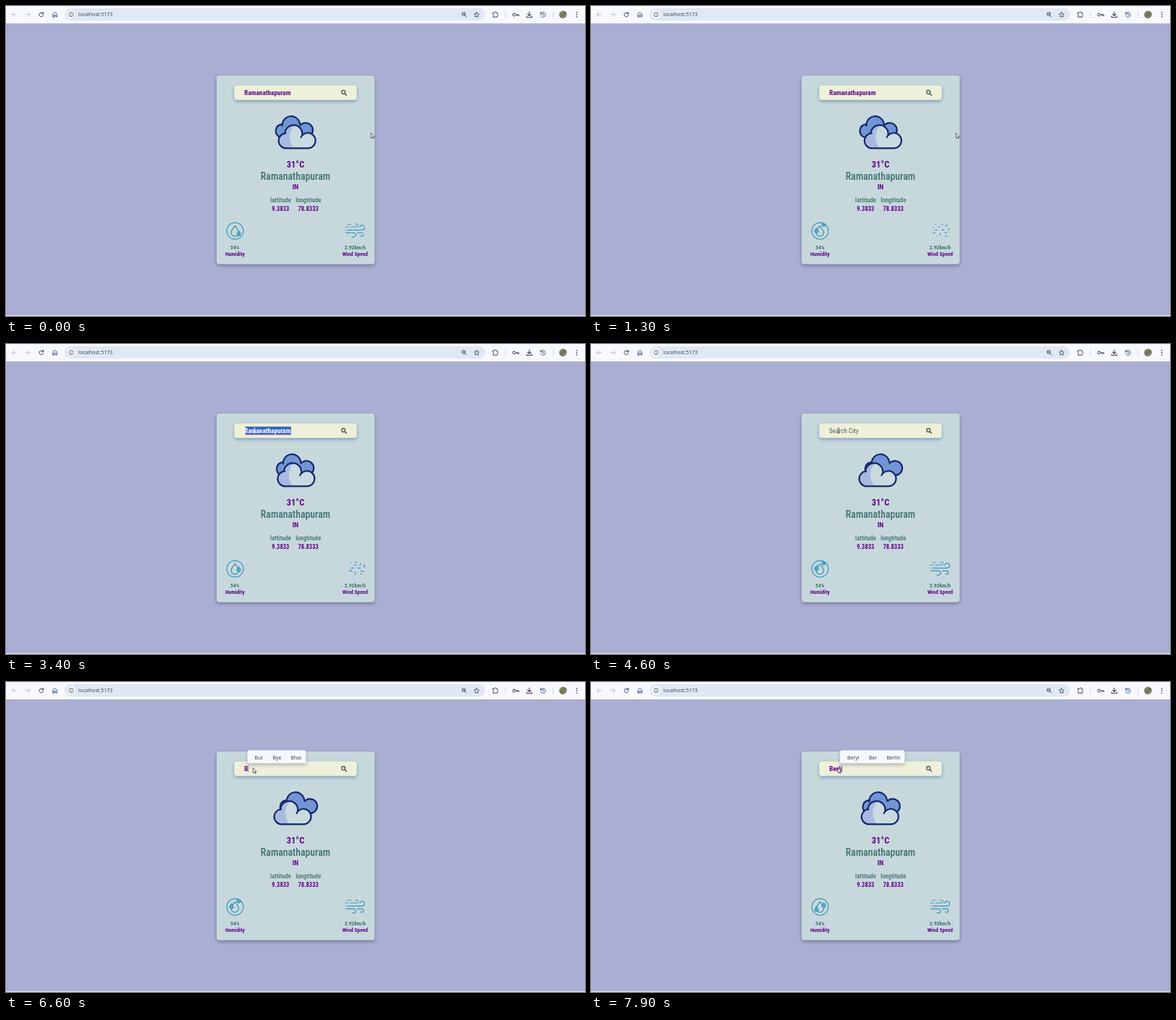
An HTML page with a canvas that plays this animation: 800x428 px, repeating every 8000 ms.

```html
<!DOCTYPE html>
<html lang="en">
<head>
<meta charset="utf-8">
<title>Weather card</title>
<style>
html, body { margin: 0; width: 100%; height: 100%; overflow: hidden; background: #abaed3; }
canvas { display: block; width: 800px; height: 428px; }
</style>
</head>
<body>
<canvas id="stage"></canvas>
<script>
const canvas = document.getElementById('stage');
const ctx = canvas.getContext('2d');
const ratio = window.devicePixelRatio || 1;
canvas.width = 800 * ratio;
canvas.height = 428 * ratio;

const LOOP = 8000, STEP = 100, TAU = Math.PI * 2;
const PURPLE = '#63058a', TEAL = '#41716f', CARD = '#c7d8dd', NAVY = '#14276a', AQUA = '#3795b5', INK = '#3c4250';
const CITY = 'Ramanathapuram';
const NARROW = '"Roboto Condensed", Roboto, sans-serif';
const UI = '"Open Sans", "Noto Sans", sans-serif';

// Tighten the tracking when only the normal width is installed.
ctx.fontStretch = 'condensed';
ctx.font = '500 100px ' + NARROW;
const tracking = ctx.measureText(CITY).width > 760 ? -0.065 : 0;
ctx.fontStretch = 'normal';

function setNarrow(size, weight) {
  ctx.fontStretch = 'condensed';
  ctx.font = `${weight} ${size}px ${NARROW}`;
  ctx.letterSpacing = tracking * size + 'px';
}

function label(str, x, y, size, weight, color, align = 'center') {
  setNarrow(size, weight);
  ctx.textAlign = align;
  ctx.fillStyle = color;
  ctx.fillText(str, x, y);
}

function uiText(str, x, y, color) {
  ctx.fontStretch = 'normal';
  ctx.letterSpacing = '0px';
  ctx.font = '7px ' + UI;
  ctx.textAlign = 'left';
  ctx.fillStyle = color;
  ctx.fillText(str, x, y);
}

function box(x, y, w, h, r, fill, shadow) {
  ctx.save();
  if (shadow) {
    ctx.shadowColor = shadow;
    ctx.shadowBlur = 5 * ratio;
    ctx.shadowOffsetY = 2 * ratio;
  }
  ctx.fillStyle = fill;
  ctx.beginPath();
  ctx.roundRect(x, y, w, h, r);
  ctx.fill();
  ctx.restore();
}

function line(d, color, width = 1, dx = 0, dy = 0) {
  ctx.save();
  ctx.translate(dx, dy);
  ctx.strokeStyle = color;
  ctx.lineWidth = width;
  ctx.lineCap = ctx.lineJoin = 'round';
  ctx.stroke(new Path2D(d));
  ctx.restore();
}

function disc(x, y, r, color) {
  ctx.fillStyle = color;
  ctx.beginPath();
  ctx.arc(x, y, r, 0, TAU);
  ctx.fill();
}

function ring(x, y, r, color, width = 1) {
  ctx.strokeStyle = color;
  ctx.lineWidth = width;
  ctx.beginPath();
  ctx.arc(x, y, r, 0, TAU);
  ctx.stroke();
}

// Linear interpolation through [position, value] pairs.
function along(keys, u) {
  if (u <= keys[0][0]) return keys[0][1];
  for (let i = 1; i < keys.length; i++) {
    const [u0, v0] = keys[i - 1], [u1, v1] = keys[i];
    if (u <= u1) return v0 + (v1 - v0) * (u - u0) / (u1 - u0);
  }
  return keys[keys.length - 1][1];
}

const ease = k => k * k * (3 - 2 * k);

function toolbar() {
  ctx.fillStyle = '#f7f9fe';
  ctx.fillRect(0, 0, 800, 24);
  box(81, 3, 581, 17, 8.5, '#dfe8f5');
  line('M3.2 0H-3.2M-.4-2.8L-3.2 0L-.4 2.8', '#b4b9c2', 0.9, 11.5, 11.8);
  line('M-3.2 0H3.2M.4-2.8L3.2 0L.4 2.8', '#b4b9c2', 0.9, 30, 11.8);
  line('M2.6-1.2A2.9 2.9 0 1 0 2.8 1M2.9-3.3V-1H.6', INK, 1, 48.8, 11.8);
  line('M-2.8 3.2V-.9L0-3.2L2.8-.9V3.2H1V.8H-1V3.2Z', '#2f4a86', 0.9, 67.6, 11.8);
  disc(90, 11.7, 5.6, '#fff');
  ring(90, 11.7, 3.1, INK, 0.8);
  line('M0 0V1.5M0-1.5V-1.4', INK, 0.8, 90, 11.7);
  uiText('localhost:5173', 100, 14.4, '#3a3d46');

  ring(632.4, 11, 2.3, INK, 0.9);
  line('M1.4 1.4L3.8 3.8M-1.1-.3H1', INK, 0.9, 632.4, 11.3);
  line('M0-3.6L1-1.2L3.6-1L1.6.8L2.2 3.3L0 2L-2.2 3.3L-1.6.8L-3.6-1L-1-1.2Z', INK, 0.8, 650.2, 12);
  line('M-3.3-2H-1.2A1.2 1.2 0 0 1 1.2-2H2.6V0A1.2 1.2 0 0 1 2.6 2.2V4H-3.3V2.2A1.2 1.2 0 0 0-3.3 0Z', INK, 1, 676.3, 11.2);
  line('M0-4V4', '#c9d6ec', 1, 690, 12);
  ring(702, 12, 2, INK, 1);
  line('M2 0H6.6V1.8M4.6 0V1.6', INK, 1, 702, 12);
  line('M0-4V1.4M-2.4-.8L0 1.6L2.4-.8M-3.6 2V3.8H3.6V2', INK, 1.1, 723, 12);
  line('M-3-1.6A3.4 3.4 0 1 1-3.3 1M-3.5-3.4V-1.2H-1.3M0-1.8V.2L1.3 1.1', '#34507c', 0.9, 742, 12);
  line('M0-4V4', '#c9d6ec', 1, 756, 12);

  const tone = ctx.createLinearGradient(765, 7, 774, 17);
  tone.addColorStop(0, '#a89a72');
  tone.addColorStop(0.5, '#667253');
  tone.addColorStop(1, '#a3a48b');
  disc(769.6, 11.8, 5.4, tone);
  for (const y of [8.8, 11.8, 14.8]) disc(788.6, y, 0.9, INK);
}

function lobes(list, base) {
  const path = new Path2D();
  for (const [x, y, r, a, b] of list) path.arc(x, y, r, a * TAU / 360, b * TAU / 360);
  if (base) path.closePath();
  return path;
}

const backCloud = lobes([[384, 172.5, 9.3, 110, 262], [396, 164.5, 12.3, 176, 338], [416, 171.3, 10, 222, 450]], true);
const frontCloud = lobes([[385, 186, 10.4, 90, 266], [395.3, 176.3, 12, 181, 371], [415, 185.8, 10.6, 221, 450]], true);

function clouds(t) {
  const d = -4.6 * Math.cos(TAU * ((t - 4600) / 1000 - 0.077));
  ctx.lineWidth = 2.2;
  ctx.lineJoin = 'round';
  ctx.strokeStyle = NAVY;

  ctx.save();
  ctx.translate(-d, 0);
  ctx.fillStyle = '#7195d5';
  ctx.fill(backCloud);
  ctx.stroke(backCloud);
  ctx.restore();

  ctx.save();
  ctx.translate(d, 0);
  ctx.fillStyle = '#c9dae0';
  ctx.fill(frontCloud);
  ctx.save();
  ctx.clip(frontCloud);
  ctx.fillStyle = '#a6b9df';
  ctx.fillRect(370, 160, 28, 40);
  ctx.fillStyle = '#c9dae0';
  ctx.beginPath();
  ctx.ellipse(407, 181, 17, 20, 0, 0, TAU);
  ctx.fill();
  ctx.restore();
  ctx.stroke(frontCloud);
  line('M407-0A10.6 10.6 0 0 0 405.4 2.6', NAVY, 2, 0, 178.8);
  ctx.restore();
}

function drop(x, y, w, h, fill, width) {
  const top = y - h / 2, low = y + h / 2 - w / 2;
  ctx.beginPath();
  ctx.moveTo(x, top);
  ctx.bezierCurveTo(x + w * 0.2, top + h * 0.22, x + w / 2, low - h * 0.16, x + w / 2, low);
  ctx.arc(x, low, w / 2, 0, Math.PI);
  ctx.bezierCurveTo(x - w / 2, low - h * 0.16, x - w * 0.2, top + h * 0.22, x, top);
  ctx.closePath();
  if (fill) {
    ctx.fillStyle = fill;
    ctx.fill();
  }
  ctx.strokeStyle = AQUA;
  ctx.lineWidth = width;
  ctx.stroke();
}

const rightDrop = [[0, 313.8], [0.2, 310.8], [0.5, 308.8], [0.7, 307.8], [0.8, 301.5], [1, 300]];
const leftDrop = [[0.45, 315], [0.7, 313.4], [0.8, 309.4], [1, 309.8]];

function humidity(t) {
  const u = (t * 3 / 1000) % 1;
  ctx.save();
  ctx.beginPath();
  ctx.arc(316.5, 310.5, 12, 0, TAU);
  ctx.clip();
  drop(316.3, 310.6, 10.6, 14.6, null, 1.2);
  drop(321.6, along(rightDrop, u), 5.2, 7.2, '#55a6c6', 1);
  if (u > 0.42) drop(311.6, along(leftDrop, u), 5.2, 7.2, '#55a6c6', 1);
  ctx.restore();
  ring(316.5, 310.5, 11.4, AQUA, 1.2);
}

const gusts = [
  'M472 309.3H492A3.3 3.3 0 1 0 488.9 305.4',
  'M476 305.2H484.5A2.2 2.2 0 1 0 482.5 301.6',
  'M469.5 313.2H480.5A3 3 0 1 1 478 318.4',
  'M485.5 313.2H491.5A2.4 2.4 0 1 1 489.6 317.2',
  'M471.5 301.5H477M469 305.2H473M469 309.3H469.4'
];
const gustFill = [[0, 0.82], [0.1, 0.55], [0.2, 0.3], [0.3, 0.25], [0.4, 0.42], [0.5, 0.78], [0.6, 1]];

function wind(t) {
  const p = (t / 1000) % 1, k = along(gustFill, p);
  ctx.save();
  if (k < 1) {
    ctx.setLineDash([9 * k, 9 * (1 - k)]);
    ctx.lineDashOffset = -p * 12;
  }
  gusts.forEach((d, i) => line(d, i === 1 || i === 4 ? '#5ca7c1' : AQUA, 1.2));
  ctx.restore();
}

function card() {
  ctx.fillStyle = '#abaed3';
  ctx.fillRect(0, 0, 800, 428);
  toolbar();
  ctx.fillStyle = '#e9ebf5';
  ctx.fillRect(0, 427, 800, 1);
  box(291, 96, 218.5, 260.5, 4, CARD, 'rgba(50,55,90,.5)');
  box(315.3, 109.6, 169.4, 20.2, 4, '#eef0da', 'rgba(70,110,150,.6)');
  ring(466.2, 119, 2.5, '#56584f', 1.3);
  line('M2 2L4.2 4.3', '#56584f', 1.5, 466.2, 119);

  label('31°C', 400, 223, 12.4, 700, PURPLE);
  label(CITY, 400, 239.6, 13.8, 500, TEAL);
  label('IN', 400, 253, 9.6, 700, PURPLE);
  label('lattitude', 379.5, 270.5, 8.7, 500, TEAL);
  label('longtitude', 417.7, 270.5, 8.7, 500, TEAL);
  label('9.3833', 379.3, 283, 8.5, 600, PURPLE);
  label('78.8333', 417.6, 283, 8.5, 600, PURPLE);
  label('54%', 316.3, 336.1, 7.5, 600, TEAL);
  label('Humidity', 316.4, 345.4, 7.5, 700, PURPLE);
  label('2.92km/h', 482.3, 336.1, 7.6, 600, TEAL);
  label('Wind Speed', 482.4, 345.4, 7.5, 700, PURPLE);
}

function typed(t) {
  if (t < 4000) return CITY;
  if (t < 6300) return '';
  return 'Berli'.slice(0, 1 + [6900, 7200, 7500, 7800].filter(at => t >= at).length);
}

function suggestions(x, words, gaps, width) {
  box(x, 94.3, width, 18, 3, '#f5f8fb', 'rgba(60,70,100,.4)');
  words.forEach((w, i) => uiText(w, x + gaps[i], 106.8, '#33363d'));
}

function field(t) {
  const str = typed(t);
  if (!str) {
    label('Search City', 329, 123, 9.2, 400, '#4b6864', 'left');
    return;
  }
  const selected = t >= 3200 && t < 4000;
  setNarrow(9.2, 600);
  const end = 329.3 + ctx.measureText(str).width;
  if (selected) {
    ctx.fillStyle = '#3c68bf';
    ctx.fillRect(330.6, 114, end - 330.2, 11);
    ctx.fillStyle = '#6b3a9c';
    ctx.fillRect(330.6, 124.4, end - 330.2, 0.9);
  }
  label(str, 329.3, 123, 9.2, 600, selected ? '#fff' : PURPLE, 'left');
  if (t >= 6300) {
    line('M0 0V10', '#6b6d74', 0.7, end + 0.3, 114.6);
    if (t < 7500) suggestions(end - 1, ['But', 'Bye', 'Bhai'], [10, 35, 60], 81);
    else suggestions(end - 2.6, ['Beryl', 'Ber', 'Berlin'], [10, 40, 64.5], 89.5);
  }
}

function pointer(t) {
  let x = 504.3, y = 175.4;
  const toField = ease(Math.min(1, Math.max(0, (t - 1900) / 600)));
  const toWord = ease(Math.min(1, Math.max(0, (t - 2600) / 500)));
  x += (405.6 - x) * toField;
  y += (119.6 - y) * toField;
  x += (343.6 - x) * toWord;
  if (t >= 4000) x = 342;
  if (t >= 6300) {
    x = 341.3;
    y = 118.6;
  }
  const inField = y < 130 && t < 6300;
  if (inField) {
    line('M-1.4-3.4H1.4M0-3.4V3.4M-1.4 3.4H1.4', t >= 3200 && t < 4000 ? '#dfe6f5' : '#4b4d55', 0.7, x, y);
    return;
  }
  ctx.save();
  ctx.translate(x, y);
  ctx.fillStyle = '#fff';
  ctx.strokeStyle = '#25262e';
  ctx.lineWidth = 0.7;
  const arrow = new Path2D('M0 0V6.9L1.6 5.4L2.7 7.8L3.8 7.3L2.8 5H4.9Z');
  ctx.fill(arrow);
  ctx.stroke(arrow);
  ctx.restore();
}

function draw(now) {
  const t = Math.floor((now % LOOP) / STEP) * STEP;
  ctx.setTransform(ratio, 0, 0, ratio, 0, 0);
  card();
  clouds(t);
  humidity(t);
  wind(t);
  field(t);
  pointer(t);
}

let start;
function tick(now) {
  if (start === undefined) start = now;
  draw(Math.max(0, now - start));
  requestAnimationFrame(tick);
}
draw(0);
requestAnimationFrame(tick);
</script>
</body>
</html>
```
